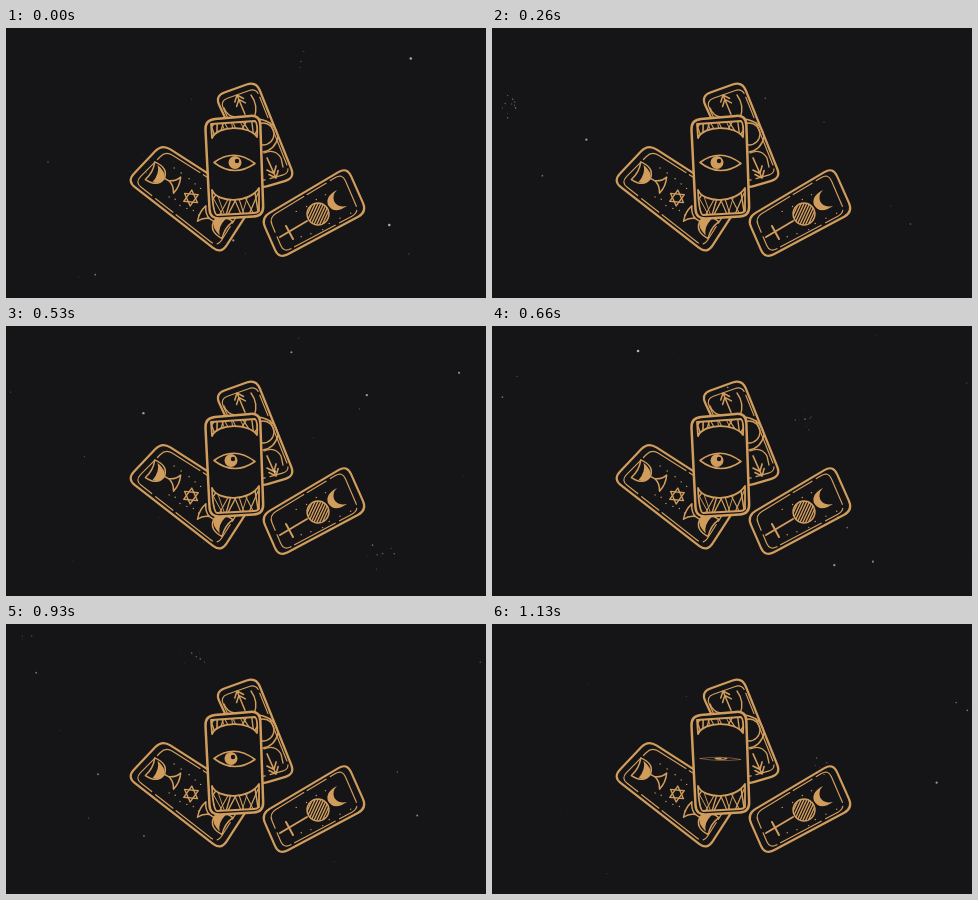
These frames come from a looping animation (480 px wide and 270 px high, 1200 ms). An HTML page with a canvas:

```html
<!DOCTYPE html>
<html lang="en">
<head>
<meta charset="utf-8">
<title>Cards</title>
<style>
html, body { margin: 0; width: 100%; height: 100%; overflow: hidden; background: #151417; }
canvas { display: block; width: 100vw; height: 100vh; }
</style>
</head>
<body>
<canvas id="stage" width="480" height="270"></canvas>
<script>
const ctx = document.getElementById('stage').getContext('2d');
const BG = '#151417', GOLD = '#d19d5d', DUST = '#e6e0cf';
const LOOP = 1200;

function random(seed) {
  return () => (seed = seed * 16807 % 2147483647) / 2147483647;
}

function stroke(d, w = 1.3, color = GOLD) {
  ctx.lineWidth = w;
  ctx.strokeStyle = color;
  ctx.stroke(new Path2D(d));
}

function fill(d, color = GOLD) {
  ctx.fillStyle = color;
  ctx.fill(new Path2D(d));
}

function disc(x, y, r, color = GOLD) {
  ctx.fillStyle = color;
  ctx.beginPath();
  ctx.arc(x, y, r, 0, 7);
  ctx.fill();
}

function ring(x, y, r, w = 1.4) {
  ctx.lineWidth = w;
  ctx.strokeStyle = GOLD;
  ctx.beginPath();
  ctx.arc(x, y, r, 0, 7);
  ctx.stroke();
}

function at(x, y, angle, size, draw) {
  ctx.save();
  ctx.translate(x, y);
  ctx.rotate(angle);
  ctx.scale(size, size);
  draw();
  ctx.restore();
}

// Point at a given distance from a towards b
function toward([ax, ay], [bx, by], dist) {
  const k = dist / Math.hypot(bx - ax, by - ay);
  return [ax + (bx - ax) * k, ay + (by - ay) * k];
}

// Quadrilateral with soft corners
function outline(pts, r) {
  ctx.beginPath();
  pts.forEach((p, i) => {
    ctx.lineTo(...toward(p, pts[(i + 3) % 4], r));
    ctx.quadraticCurveTo(...p, ...toward(p, pts[(i + 1) % 4], r));
  });
  ctx.closePath();
}

// Card body with a broken inner line; inset 0 leaves the line out
function card(pts, inset) {
  outline(pts, 10);
  ctx.fillStyle = BG;
  ctx.fill();
  ctx.strokeStyle = GOLD;
  ctx.lineWidth = inset ? 2.2 : 2.5;
  ctx.stroke();
  if (!inset) return;
  outline(pts.map((p, i) => toward(p, pts[(i + 2) % 4], inset)), 8);
  ctx.lineWidth = 1.2;
  ctx.setLineDash([46, 4, 22, 5]);
  ctx.stroke();
  ctx.setLineDash([]);
}

// Row of small dots that strays a little from its line
function dotRow(x1, y1, x2, y2, n) {
  const rnd = random(x1 * 31 + y1);
  for (let i = 0; i < n; i++) {
    const k = i / (n - 1);
    disc(x1 + (x2 - x1) * k + rnd() * 3, y1 + (y2 - y1) * k + rnd() * 3, 0.7);
  }
}

function goblet() {
  stroke('M-8 -9Q-9 3 0 4Q9 3 8 -9Q0 -6 -8 -9Z', 1.2);
  fill('M-7 -3Q-6 4 0 4Q5 3 7 -6Q2 -1 -7 -3Z');
  stroke('M0 4V9M-7 16Q-1 13 0 8Q2 13 7 15Q0 18 -7 16', 1.2);
}

function star() {
  for (const turn of [-1, 1]) {
    ctx.beginPath();
    for (let i = 0; i < 3; i++) {
      const a = turn * Math.PI / 2 + i * Math.PI * 2 / 3;
      ctx.lineTo(8 * Math.cos(a), 8 * Math.sin(a));
    }
    ctx.closePath();
    ctx.lineWidth = 1.4;
    ctx.strokeStyle = GOLD;
    ctx.stroke();
  }
}

// Arrow along +y, its tip at the origin
function arrow() {
  stroke('M0 -22V0M-5 -6L0 0L5 -6M-5 -11L0 -5L5 -11', 1.6);
}

function backCard() {
  card([[209, 68], [250, 53], [289, 150], [252, 161]], 7);
  at(231, 67, 2.75, 0.95, arrow);
  stroke('M218 80Q221 88 229 89M245 67Q253 78 248 90', 1.4);
  ring(257, 106, 11);
  stroke('M253 91Q270 94 272 109Q269 122 257 124', 1.4);
  stroke('M258 125Q269 120 275 130L277 139', 1.3);
  at(270, 150, -0.42, 1, arrow);
}

function leftCard() {
  card([[156, 116], [248, 175], [215, 226], [121, 153]], 8);
  at(154, 148, -1.08, 1.25, goblet);
  at(185, 170, 0.1, 1, star);
  at(212, 196, 2.14, 1.25, goblet);
  dotRow(168, 139, 194, 158, 5);
  dotRow(163, 167, 190, 186, 6);
}

function rightCard() {
  card([[255, 190], [341, 139], [361, 184], [273, 231]], 8);
  stroke('M274 209L301 193M280 198L287 211', 2);
  ctx.save();
  ring(312, 186, 11);
  ctx.clip();
  for (let x = 290; x < 325; x += 2.8) stroke(`M${x} 199L${x + 12} 173`, 1.4);
  ctx.restore();
  fill('M331 162Q319 168 322 177Q328 187 341 178Q331 180 328 173Q326 167 331 162Z');
  dotRow(290, 182, 318, 165, 4);
  dotRow(295, 208, 342, 185, 6);
}

// Irregular fan of strokes inside a shape
function band(d, y) {
  const rnd = random(y);
  ctx.save();
  ctx.clip(new Path2D(d));
  for (let x = 203; x < 256; x += 4) {
    const lean = (rnd() - 0.5) * 16;
    stroke(`M${x - lean} ${y}L${x + lean} ${y + 24}`, 0.9 + rnd() * 0.7);
  }
  ctx.restore();
  stroke(d, 1.8);
}

function frontCard() {
  card([[199, 92], [254, 87], [257.5, 188], [204, 191]], 0);
  band('M205 96L249 93Q252 95 251 109C243 97 212 97 206 110Z', 91);
  band('M206 162C212 176 244 175 253 160L253 183Q251 185 248 185L211 187Q207 186 206 162Z', 165);
}

function eye(step) {
  const open = Math.max(0.06, Math.min(1, ...[2, 17.4].map(c => Math.abs(step - c) / 2)));
  const gaze = step > 2 && step < 16 ? 225 : 229;
  const h = 15 * open;
  const lid = `M208 134.5Q228 ${134.5 - h} 249 135.5Q228 ${135 + h} 208 134.5Z`;
  fill(lid, BG);
  ctx.save();
  ctx.clip(new Path2D(lid));
  ctx.translate(gaze, 134.5);
  ctx.scale(1, open);
  disc(0, 0, 6.5);
  disc(2, -1.5, 2.2, BG);
  ctx.restore();
  ctx.globalAlpha = 0.5 + 0.5 * open;
  stroke(lid, 0.6 + open);
  ctx.globalAlpha = 1;
}

// Film dust: faint specks everywhere, few large ones and one loose cluster
function dust(step) {
  const rnd = random(7919 * (step + 3));
  const speck = (x, y, size) => {
    ctx.globalAlpha = 0.1 + 0.7 * size;
    disc(x, y, 0.35 + size, DUST);
  };
  for (let i = 0; i < 34; i++) speck(rnd() * 480, 9 + rnd() * 252, rnd() ** 7);
  const cx = rnd() * 480, cy = 30 + rnd() * 210, spread = 12 + rnd() * 20;
  for (let i = 0; i < 14; i++) {
    speck(cx + (rnd() + rnd() - 1) * spread, cy + (rnd() + rnd() - 1) * spread, rnd() ** 2 * 0.5);
  }
  ctx.globalAlpha = 1;
}

function draw(step) {
  ctx.fillStyle = BG;
  ctx.fillRect(0, 0, 480, 270);
  ctx.lineCap = ctx.lineJoin = 'round';
  backCard();
  leftCard();
  rightCard();
  frontCard();
  eye(step);
  dust(step);
}

// Three steps every 200 ms: 60, 70 and 70
function stepAt(t) {
  const r = t % 200;
  return Math.floor(t / 200) * 3 + (r >= 60) + (r >= 130);
}

const start = performance.now();
let shown = -1;

function tick() {
  const step = stepAt((performance.now() - start) % LOOP);
  if (step !== shown) draw(shown = step);
  requestAnimationFrame(tick);
}
tick();
</script>
</body>
</html>
```
